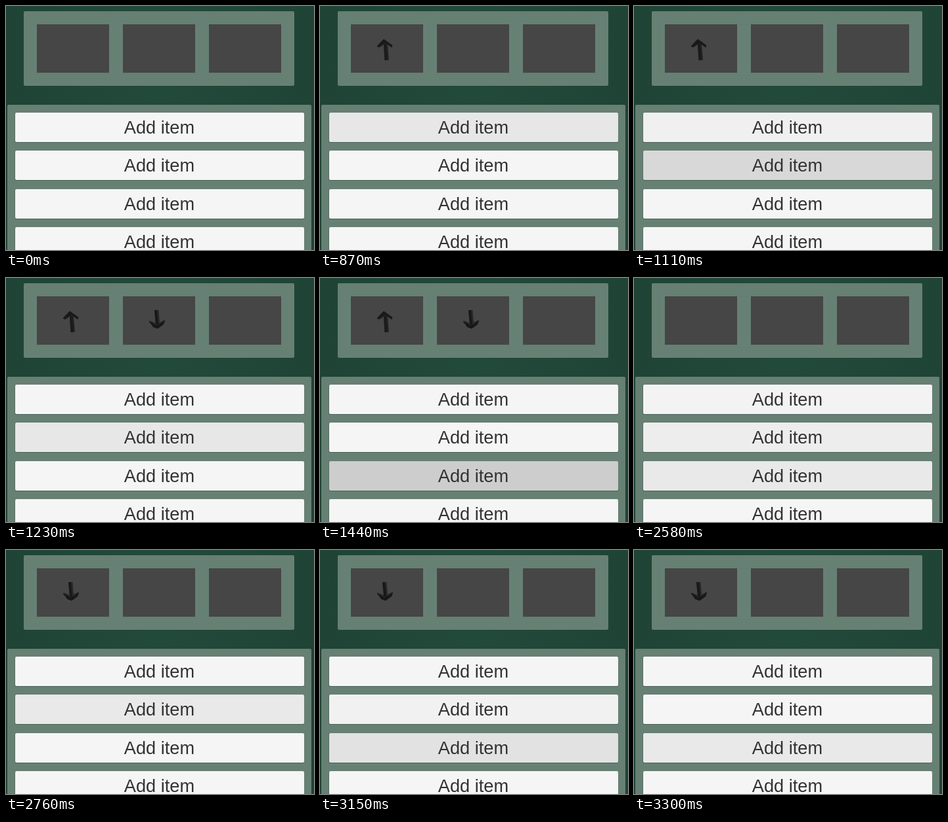
Animation of 469 by 373 pixels, one loop 3.93 s. Source, as an HTML page:

```html
<!DOCTYPE html>
<html lang="en">
<head>
<meta charset="utf-8">
<title>Add item</title>
<style>
  html, body { margin: 0; width: 100%; height: 100%; overflow: hidden; background: #204638; }
  svg { display: block; width: 100%; height: 100%; }
  text { font: 27.2px "Liberation Sans", Arial, sans-serif; fill: #323232; text-anchor: middle; }
</style>
</head>
<body>
<svg viewBox="0 0 469 373" preserveAspectRatio="none">
  <defs>
    <linearGradient id="bg">
      <stop offset="0" stop-color="#1f4436"/>
      <stop offset=".5" stop-color="#224a3a"/>
      <stop offset="1" stop-color="#1f4436"/>
    </linearGradient>
    <!-- Arrows are drawn around the centre of a slot -->
    <g id="up">
      <path d="M-5-14L8-4L7.5-1L1-6L3 17.500L-3.500 18L-5-6L-12-1.500L-15-3Z" fill="#242424"/>
      <path d="M-5-14.500L8.500-5L7-2.500L-3-8.500L-12-2L-15.500-3.500Z" fill="#191919"/>
      <path d="M-5-7L-1-7L1 17.500L-3.500 18Z" fill="#1b1b1b"/>
    </g>
    <g id="down">
      <path d="M-7-16L-.5-16L1 3L8.500-1L9 2L-2 12.500L-15 3L-14.500 0L-5 4Z" fill="#282828"/>
      <path d="M-7-16L-3-15.500L-1 8L-5 5Z" fill="#181818"/>
      <path d="M-15 1L-3 8L9 0L7 6L-2 12.500L-9 10Z" fill="#171717"/>
    </g>
    <g id="left">
      <path d="M-18-2L-6-15L-3-14L-8-5L16-4L16 3L-8 4L-4 9L-6 10Z" fill="#272727"/>
      <path d="M-18-2L-6-15L-10-3L-4 9L-6 10Z" fill="#181818"/>
      <path d="M-10 0L16-1L16 3L-8 4Z" fill="#191919"/>
    </g>
  </defs>
  <rect width="469" height="373" fill="url(#bg)"/>
  <rect x="27" y="8" width="412" height="114" rx="2" fill="#678074"/>
  <rect x="2" y="151" width="463" height="230" rx="2" fill="#678074"/>
  <g id="slots"></g>
  <g id="buttons"></g>
</svg>
<script>
const LOOP = 3930;
const NORMAL = 0xf5;

// Grey level of each button: [time, level], held until the next entry
const shades = [
  [[0, NORMAL], [870, 0xe7], [1110, 0xf0], [1140, NORMAL], [2580, 0xf3], [2670, NORMAL]],
  [[0, NORMAL], [990, 0xee], [1020, 0xe9], [1110, 0xd8], [1140, 0xc8], [1200, 0xda],
   [1230, 0xe7], [1260, 0xe9], [1410, 0xf2], [1440, NORMAL], [2580, 0xed], [2670, 0xd8],
   [2700, 0xc8], [2730, 0xda], [2760, 0xe9], [3150, 0xf1], [3180, NORMAL]],
  [[0, NORMAL], [1260, 0xf1], [1290, 0xed], [1320, 0xe9], [1410, 0xda], [1440, 0xcd],
   [1470, 0xc8], [1500, 0xda], [1530, 0xe9], [2670, 0xf0], [2700, NORMAL],
   [3150, 0xe2], [3180, 0xd0], [3240, 0xc8], [3270, 0xda], [3300, 0xe9]],
  [[0, NORMAL]]
];

const items = [
  { slot: 0, kind: "up", from: 870, to: 1710 },
  { slot: 1, kind: "down", from: 1200, to: 1890 },
  { slot: 2, kind: "left", from: 1500, to: 2040 },
  { slot: 0, kind: "down", from: 2730, to: LOOP }
];

function add(parent, name, attrs) {
  const node = document.createElementNS("http://www.w3.org/2000/svg", name);
  for (const key in attrs) node.setAttribute(key, attrs[key]);
  return parent.appendChild(node);
}

const slotLayer = document.getElementById("slots");
const buttonLayer = document.getElementById("buttons");

for (let i = 0; i < 3; i++) {
  add(slotLayer, "rect", { x: 47 + 131 * i, y: 28, width: 110, height: 74, fill: "#464646" });
}
for (const item of items) {
  item.node = add(slotLayer, "use", {
    href: "#" + item.kind, x: 102 + 131 * item.slot, y: 65
  });
}

const faces = shades.map((_, i) => {
  const y = Math.floor(163 + 58.5 * i);
  add(buttonLayer, "rect", { x: 13.5, y: y, width: 440.5, height: 46, rx: 2, fill: "#4b6156" });
  const face = add(buttonLayer, "rect", { x: 14, y, width: 440, height: 45, rx: 2 });
  add(buttonLayer, "text", { x: 233.5, y: y + 32 }).textContent = "Add item";
  return face;
});

function levelAt(steps, t) {
  let level = NORMAL;
  for (const [time, value] of steps) if (t >= time) level = value;
  return level;
}

function draw(t) {
  faces.forEach((face, i) => {
    const v = levelAt(shades[i], t);
    face.setAttribute("fill", `rgb(${v},${v},${v})`);
  });
  for (const { node, from, to } of items) {
    node.setAttribute("visibility", t >= from && t < to ? "visible" : "hidden");
  }
}

const start = performance.now();
function tick() {
  draw((performance.now() - start) % LOOP);
  requestAnimationFrame(tick);
}
draw(0);
requestAnimationFrame(tick);
</script>
</body>
</html>
```
